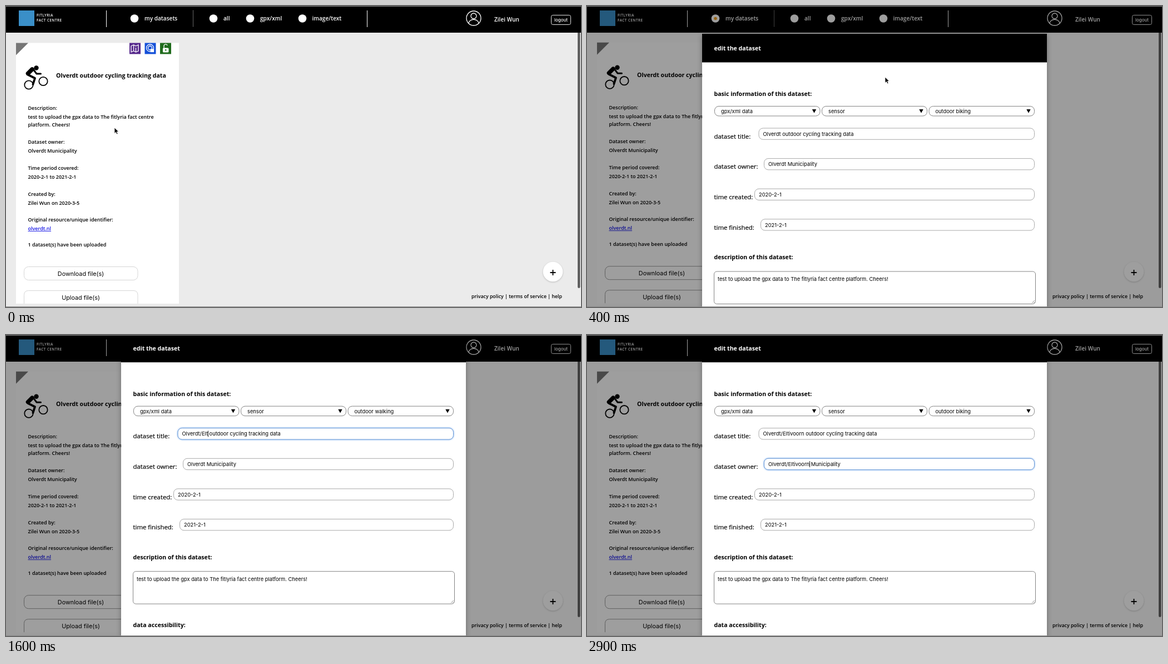
Recreate the animation shown at these times as an HTML page. Size 1034 by 542 pixels, loop 3 s.

```html
<!DOCTYPE html>
<html lang="en">
<head>
<meta charset="utf-8">
<title>Dataset editor</title>
<style>
html, body { margin: 0; width: 100%; height: 100%; overflow: hidden; background: #ebebeb; }
svg { display: block; width: 100vw; height: 100vh; }
text { font: 600 9px "Open Sans", sans-serif; white-space: pre; }
.nav text { font-size: 10.1px; fill: #fff; }
.nav .logo text { font-size: 6.3px; letter-spacing: .5px; }
.nav .out { font: 500 7.9px Inter, sans-serif; text-anchor: middle; }
.nav circle { fill: #fff; }
.bold text, text.bold { font-weight: 700; font-size: 10.6px; }
.label text { font-weight: 400; font-size: 11.4px; stroke: #000; stroke-width: .2; }
.ui text { font: 400 9.3px Inter, "Liberation Sans", sans-serif; }
.btn text { font-size: 10.8px; text-anchor: middle; }
.btn rect, .btn path { fill: #fff; stroke: var(--edge, #d6d6d6); }
.box rect { fill: #fff; stroke: #777; stroke-width: .9; }
.box rect.field { stroke: #a0a0a0; }
.box rect.on { stroke: #5e8fd0; filter: drop-shadow(0 0 1.5px #6aa5f0); }
.sheet { fill: #fff; filter: drop-shadow(0 3px 5px rgba(0,0,0,.3)); }
.line, .nav .line circle { fill: none; stroke: #fff; stroke-width: 1.3; }
</style>
</head>
<body>
<svg viewBox="0 0 1034 542" preserveAspectRatio="none">
  <defs>
    <path id="tri" d="M-3.7-3.2h7.4L0 3.6z"/>
  </defs>
  <rect id="back" width="1034" height="542"/>

  <g class="nav">
    <rect width="1034" height="48" fill="#000"/>
    <rect x="23" y="8" width="28" height="28" fill="#3a8fc8"/>
    <g class="logo">
      <text x="55" y="19.3">FITLYRIA</text>
      <text x="55" y="27.6">FACT CENTRE</text>
    </g>
    <path d="M180.5 8v30M649.5 8v30" stroke="#fff"/>
    <path d="M336.5 8v30" stroke="#ccc" stroke-dasharray="1 1"/>
    <circle cx="231" cy="22.5" r="7.3"/><circle cx="373" cy="22.5" r="7.3"/>
    <circle cx="439" cy="22.5" r="7.3"/><circle cx="533" cy="22.5" r="7.3"/>
    <circle id="pick" cx="231" cy="22.5" r="2.8" style="fill:#f0a020"/>
    <text x="249" y="25.6">my datasets</text><text x="391" y="25.6">all</text>
    <text x="457" y="25.6">gpx/xml</text><text x="550.5" y="25.6">image/text</text>
    <g class="line">
      <circle cx="841" cy="22" r="13"/>
      <circle cx="841" cy="18" r="5"/>
      <path d="M832 31c1-9 17-9 18 0"/>
      <rect x="980.5" y="16.5" width="35" height="17" rx="3" stroke-width=".9"/>
    </g>
    <text x="878" y="27.6">Zilei Wun</text>
    <text class="out" x="998" y="27.7">logout</text>
  </g>

  <g id="page">
    <rect x="18" y="66.5" width="293" height="469.5" fill="#fff"/>
    <path id="corner"/>
    <rect x="222" y="66.5" width="20" height="20" fill="#56298c"/>
    <path class="line" d="M225 72l4.5-2 4 2 4.5-2v11l-4.5 2-4-2-4.500 2zM229.500 70v11M233.500 75v8"/>
    <rect x="249.5" y="66.5" width="20" height="20" fill="#1450d8"/>
    <g class="line">
      <circle cx="259" cy="75.5" r="6.5"/><circle cx="259" cy="75.5" r="3.5"/>
      <rect x="260.5" y="78" width="5" height="4.5" fill="#fff"/>
    </g>
    <rect x="277" y="66.5" width="20" height="20" fill="#1f6b1c"/>
    <path class="line" d="M284 76v-4a3.2 3.2 0 0 1 6.2-1"/>
    <rect x="282" y="75.5" width="10.5" height="8" rx="1.5" fill="#fff"/>
    <circle cx="287.2" cy="79.3" r="1.3" fill="#1f6b1c"/>

    <g fill="none" stroke="#000" stroke-linejoin="round" stroke-linecap="round">
      <circle cx="41" cy="142" r="7.7" stroke-width="1.8"/>
      <circle cx="67" cy="135.5" r="7.7" stroke-width="1.8"/>
      <path d="M39.5 121.500L47 114" stroke-width="7.500"/>
      <path d="M49 114l6 8h7.500" stroke-width="3"/>
      <path d="M40 124l12 6-3.500 11" stroke-width="3.800"/>
      <circle cx="54.5" cy="111.5" r="4.2" fill="#000" stroke="none"/>
    </g>
    <text class="bold" x="90" y="129">Olverdt outdoor cycling tracking data</text>
    <g id="info"></g>
    <g class="btn ui">
      <rect x="32.5" y="469.5" width="204.5" height="24" rx="8"/>
      <text x="134.5" y="485.6">Download file(s)</text>
      <path d="M32.5 536v-15.5q0-8 8-8h188.5q8 0 8 8v15.5"/>
      <text x="134.5" y="528.6">Upload file(s)</text>
    </g>
  </g>
  <circle cx="983.5" cy="478.5" r="17.8" fill="#fff" style="filter:drop-shadow(0 1px 1.5px rgba(0,0,0,.2))"/>
  <path d="M978.5 480h10M983.5 475v10" stroke="#000" stroke-width="1.8"/>
  <text x="837" y="526.3" style="font-size:8.8px">privacy policy | terms of service | help</text>

  <rect id="dim" width="1034" height="542" opacity=".38"/>

  <g id="modal">
    <rect class="sheet" x="207" y="50" width="620" height="640"/>
    <rect x="207" y="50" width="620" height="51.5"/>
    <g class="bold">
      <text x="228.5" y="80" fill="#fff">edit the dataset</text>
      <text x="228.5" y="162.3">basic information of this dataset:</text>
      <text x="228.5" y="456.3">description of this dataset:</text>
      <text x="228.5" y="578.5">data accessibility:</text>
    </g>
    <g class="label" id="labels">
      <text x="228.5" y="615">I would like to keep this dataset open access.</text>
    </g>
    <g class="box ui" id="boxes">
      <rect x="228.5" y="478" width="578" height="58.5" rx="5"/>
      <path d="M800 535l5-5M803 535l2-2" stroke="#777" stroke-width=".8"/>
      <text x="235" y="495">test to upload the gpx data to The fitlyria fact centre platform. Cheers!</text>
      <rect x="796" y="595.5" width="8" height="8" rx="1.5" style="fill:#3b78e0;stroke:none"/>
      <path d="M798 599.5l1.6 1.7 2.7-3.6" class="line"/>
    </g>
    <path id="caret" d="M0-9v11" stroke="#000" stroke-width=".9"/>
  </g>

  <rect x="1028" y="1" width="4.5" height="507" rx="2.2" opacity=".6"/>
  <path d="M0 .5h1034M0 541.5h1034" stroke="#888"/>
  <path id="arrow" d="M0 0v10.5l2.5-2.3 1.7 3.7 1.9-.9-1.7-3.5h3.3z" stroke="#fff" stroke-width=".8"/>
  <path id="beam" d="M-1.5-5.5L0-4.5l1.5-1M0-4.5v9M-1.5 5.5L0 4.5l1.5 1" fill="none" stroke="#000" stroke-width=".8"/>
</svg>
<script>
const $ = id => document.getElementById(id);
const NS = 'http://www.w3.org/2000/svg';

function add(parent, tag, attrs, str) {
  const el = document.createElementNS(NS, tag);
  set(el, attrs);
  if (str) el.textContent = str;
  return parent.appendChild(el);
}
function set(el, attrs) {
  for (const k in attrs) el.setAttribute(k, attrs[k]);
}
const show = (el, on) => set(el, { visibility: on ? 'visible' : 'hidden' });
const move = (el, x, y) => set(el, { transform: `translate(${x} ${y})` });

const info = [
  [187, 'Description:'],
  [203, 'test to upload the gpx data to The fitlyria fact centre'],
  [217, 'platform. Cheers!'],
  [248, 'Dataset owner:'], [264, 'Olverdt Municipality'],
  [295, 'Time period covered:'], [310.5, '2020-2-1 to 2021-2-1'],
  [341.5, 'Created by:'], [357.5, 'Zilei Wun on 2020-3-5'],
  [388, 'Original resource/unique identifier:'], [404, 'olverdt.nl'],
  [432.5, '1 dataset(s) have been uploaded']
];
for (const [y, str] of info) {
  const line = add($('info'), 'text', { x: 39.5, y }, str);
  if (str.endsWith('.nl')) set(line, { fill: '#1414e6', 'text-decoration': 'underline' });
}

function select(x, y, w, str) {
  const box = add($('boxes'), 'rect', { x, y, width: w, height: 17.5, rx: 7.5 });
  const text = add($('boxes'), 'text', { x: x + 11.5, y: y + 12.4 }, str);
  add($('boxes'), 'use', { href: '#tri', x: x + w - 10.5, y: y + 8.7 });
  return { box, text };
}
function field(row, x, label, str) {
  const y = 220 + row * 54.6, tx = x + 7.5, ty = y + 13.8;
  add($('labels'), 'text', { x: 228.5, y: y + 18.8 }, label);
  const box = add($('boxes'), 'rect', { class: 'field', x, y, width: 804.5 - x, height: 20.3, rx: 7.5 });
  const text = add($('boxes'), 'text', { x: tx, y: ty }, str);
  return { box, text, x: tx, y: ty };
}
select(229.5, 180.5, 189.5, 'gpx/xml data');
select(422.5, 180.5, 189, 'sensor');
const kind = select(615, 180.5, 189.5, 'outdoor biking');
select(477, 597, 315, 'Yes');
const title = field(0, 309, 'dataset title:');
const owner = field(1, 318.5, 'dataset owner:');
field(2, 301.5, 'time created:', '2020-2-1');
field(3, 312.5, 'time finished:', '2021-2-1');

const city = 'Olverdt', extra = '/Eltivoorn';
// letters of the extra city typed on each tick
const typed = (s, start, counts) => s < start ? 0 : counts[Math.min(s - start, counts.length - 1)];

// pointer way points: tick, x, y
const way = [[0, 195, 219], [3, 21, 75], [4, 536, 128], [7, 700, 190], [8, 695, 192],
  [11, 510, 308], [13, 352, 178], [18, 352, 178], [20, 700, 137], [22, 690, 142],
  [24, 406, 232], [25, 359, 232], [30, 359, 232]];
function pointer(s) {
  const i = way.findIndex((p, n) => n && s <= p[0]);
  const [a, x, y] = way[i - 1], [b, u, v] = way[i], k = (s - a) / (b - a);
  return [x + (u - x) * k, y + (v - y) * k];
}

function draw(s) {
  const open = s >= 3, sliding = s === 3;
  const text = s >= 13 && s <= 18 || s >= 24;
  const fold = sliding ? 26 : 22;
  set($('back'), { fill: open ? '#fbfbfb' : '#ebebeb' });
  move($('page'), 0, open ? -0.8 : 0);
  $('page').style.setProperty('--edge', open ? '#999' : '#d6d6d6');
  set($('corner'), { fill: sliding ? '#10b4ff' : '#767676', d: `M18 66.5h${fold}l${-fold} ${fold}z` });
  show($('pick'), s >= 4);
  show($('dim'), open);
  show($('modal'), open);
  set($('modal'), { opacity: sliding ? 0.52 : 1 });
  move($('modal'), 0, sliding ? -103.5 : s < 7 ? 0 : s < 12 ? -0.8 : -52.3);

  kind.text.textContent = s >= 9 && s < 22 ? 'outdoor walking' : 'outdoor biking';
  const a = typed(s, 14, [1, 2, 4, 7, 10]), b = typed(s, 26, [2, 5, 8, 10]);
  title.text.textContent = city + extra.slice(0, a) + ' outdoor cycling tracking data';
  owner.text.textContent = city + extra.slice(0, b) + ' Municipality';

  kind.box.classList.toggle('on', s >= 7 && s < 13 || s >= 20 && s < 24);
  title.box.classList.toggle('on', s >= 13 && s < 20);
  owner.box.classList.toggle('on', s >= 24);

  const f = s < 20 ? title : owner, n = city.length + (s < 20 ? a : b);
  show($('caret'), s >= 13 && s < 20 || s >= 25);
  move($('caret'), f.x + f.text.getSubStringLength(0, n) + 0.5, f.y);

  const [x, y] = pointer(s);
  move($('arrow'), x, y);
  move($('beam'), x, y);
  show($('arrow'), !text);
  show($('beam'), s === 13 || s === 24 || s === 25);
}

let last = -1;
function tick() {
  const s = Math.floor(performance.now() % 3000 / 100);
  if (s !== last) draw(last = s);
  requestAnimationFrame(tick);
}
tick();
</script>
</body>
</html>
```
